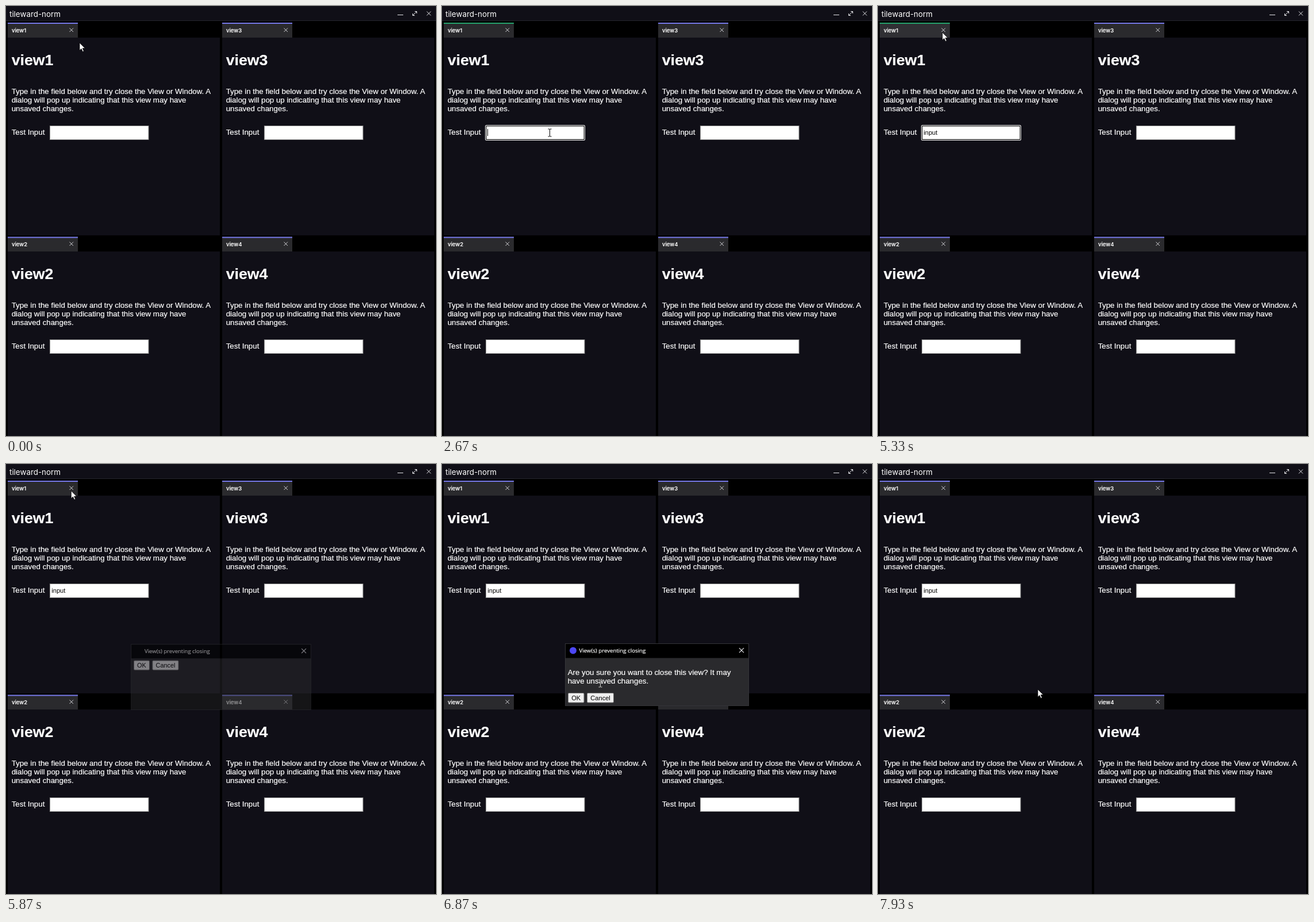
Write an HTML page that moves like this. It is 748 px wide and 748 px high and loops after 8 s.

```html
<!DOCTYPE html>
<html lang="en">
<head>
<meta charset="utf-8">
<title>Closing a view with unsaved input</title>
<style>
html, body { margin: 0; width: 100%; height: 100%; overflow: hidden; background: #000; }
svg { display: block; width: 748px; height: 748px; }
text { fill: #fff; stroke: #fff; stroke-width: .2px; font: 13.3px "Liberation Sans", Arial, sans-serif; white-space: pre; }
.title { font: 13.4px Inter, sans-serif; stroke: none; }
.tab { font: 500 9.5px Inter, sans-serif; }
.h1 { font-size: 26.7px; font-weight: bold; }
.small { font-size: 11.1px; fill: #000; stroke: none; }
.caption { font: 9.7px "Open Sans", sans-serif; }
.line { fill: none; stroke: #e4e4e8; }
</style>
</head>
<body>
<svg viewBox="0 0 748 748">
  <rect width="748" height="748"/>
  <rect width="748" height="25" fill="#100f17"/>
  <rect y="25" width="748" height="1" fill="#25252d"/>
  <text class="title" x="6" y="18.5">tileward-norm</text>
  <path class="line" d="M681 15.5h10M732 9.5l7 7m0-7l-7 7M707.5 16.5l7-7m-3.5 0h3.5v3.5M707.5 13v3.5h3.5"/>
  <g id="views"></g>
  <rect id="splitter" x="3" y="399" width="742" height="3" fill="#2f3036"/>
  <g id="focus">
    <rect x="75" y="207" width="174" height="27" rx="2.5" fill="#fff"/>
    <rect x="76" y="208" width="172" height="25" rx="1.5" fill="#101010"/>
    <rect x="77.3" y="209.3" width="169.4" height="22.4" fill="#fff"/>
  </g>
  <text id="typed" class="small" x="79.3" y="224"></text>
  <rect id="caret" y="214" width="1" height="12"/>

  <g id="dialog">
    <rect id="frame" x="214" y="312" width="320" fill="#2a2a2d"/>
    <rect x="214" y="312" width="320" height="25.5"/>
    <rect id="edge" x="214.5" y="312.5" width="319" fill="none" stroke="#343438"/>
    <circle id="logo" cx="228" cy="324.5" r="6" fill="#4d47f5"/>
    <text class="caption" x="238.4" y="328">View(s) preventing closing</text>
    <path class="line" stroke-width="1.2" d="M517 320.2l8 8m0-8l-8 8"/>
    <g id="message">
      <text x="218.7" y="366.8">Are you sure you want to close this view? It may</text>
      <text x="218.7" y="381.8">have unsaved changes.</text>
    </g>
    <g id="buttons">
      <rect x="219.5" y="398.5" width="27.5" height="16.5" rx="1.5" fill="#efefef" stroke="#767676"/>
      <rect id="cancel" x="252.5" y="398.5" width="46" height="16.5" rx="1.5" stroke="#767676"/>
      <text class="small" x="225.2" y="411">OK</text>
      <text class="small" x="258.3" y="411">Cancel</text>
    </g>
  </g>

  <path id="arrow" fill="#fff" stroke="#000" stroke-width=".7" d="M0 0V13.2L3.1 10.4L5.3 15.4L7.4 14.5L5.2 9.6H9.4Z"/>
  <path id="beam" fill="none" stroke="#fff" style="mix-blend-mode:difference" d="M-3 -6.5h2.5l.5 .5l.5 -.5h2.5M0 -6V6M-3 6.5h2.5l.5 -.5l.5 .5h2.5"/>
  <path id="resize" fill="#fff" stroke="#222" stroke-width=".8" d="M-9 0L-4.5 -4.5V-1.8H4.5V-4.5L9 0L4.5 4.5V1.8H-4.5V4.5Z"/>
</svg>
<script>
const LOOP = 8000, STEP = 1000 / 15;
const $ = id => document.getElementById(id);
const set = (id, name, value) => $(id).setAttribute(name, value);
const show = (id, on) => set(id, 'visibility', on ? 'visible' : 'hidden');
const between = (v, a, b) => v >= a && v < b;
const clamp = v => Math.max(0, Math.min(1, v));

const view = (n, x, y, top) => `<g transform="translate(${x} ${y})">
  <rect id="tab${n}" x="3" y="${top}" width="122" height="${55 - top}" fill="#2a2a2d"/>
  <rect id="bar${n}" x="3" y="${top}" width="122" height="2" fill="#7577e6"/>
  <text class="tab" x="10" y="45.5">view${n}</text>
  <path class="line" stroke-width=".9" d="M110.5 38.5l6.5 6.5m0-6.5l-6.5 6.5"/>
  <rect x="3" y="55" width="369" height="${y ? 321 : 344}" fill="#100f17"/>
  <text class="h1" x="9.7" y="103.2">view${n}</text>
  <text x="9.7" y="152.8">Type in the field below and try close the View or Window. A</text>
  <text x="9.7" y="167.8">dialog will pop up indicating that this view may have</text>
  <text x="9.7" y="182.8">unsaved changes.</text>
  <text x="9.7" y="224">Test Input</text>
  <rect id="field${n}" x="76.4" y="208.5" width="171.6" height="24" fill="#fff" stroke="#858585"/>
</g>`;
$('views').innerHTML = view(1, 0, 0, 29) + view(2, 0, 372, 29.5) + view(3, 373, 0, 29) + view(4, 373, 372, 29.5);

// Pointer path: time, x, y
const path = [
  [0, 128, 64], [200, 130, 76], [600, 148, 180], [870, 152, 212], [1070, 150, 217],
  [1800, 150, 217], [1930, 187, 220], [4600, 187, 220], [4800, 234, 222],
  [4930, 210, 165], [5130, 135, 72], [5330, 112, 46], [6130, 114, 47],
  [6330, 167, 86], [6400, 217, 137], [6600, 258, 280], [6800, 274, 370],
  [7000, 278, 400], [7870, 278, 400], [7930, 278, 392], [LOOP, 278, 392]
];
const keys = [3400, 3470, 3730, 3930, 4070];
const caretX = [79, 82, 88, 94, 100, 103];

function pointer(t) {
  const i = path.findIndex(p => p[0] > t);
  const [t0, x0, y0] = path[i - 1], [t1, x1, y1] = path[i];
  const k = (t - t0) / (t1 - t0);
  return [x0 + (x1 - x0) * k, y0 + (y1 - y0) * k];
}

function draw(t) {
  const [x, y] = pointer(t);
  const inField = between(x, 76, 248) && between(y, 208, 233);
  const open = between(t, 5735, 7730);
  const loaded = t >= 6070;

  // Input field and its tab
  const focused = between(t, 1600, 5735);
  const count = keys.filter(k => t >= k).length;
  const typing = between(t, 3400, 4600);
  show('focus', focused);
  $('typed').textContent = 'input'.slice(0, count);
  set('caret', 'x', caretX[count]);
  show('caret', typing || between(t, 1600, 2130) || between(t, 2670, 3200));
  set('bar1', 'fill', focused ? '#24a06b' : '#7577e6');
  set('tab1', 'fill', between(t, 5200, 5600) ? '#303034' : '#2a2a2d');
  set('field1', 'stroke', inField ? '#4f4f4f' : '#858585');

  // Dialog fades in while growing, then fits its height to the message
  const grow = clamp((t - 5735) / 265), scale = .96 + .04 * grow;
  const height = loaded ? 109 : 117;
  show('dialog', open);
  set('dialog', 'opacity', t >= 7670 ? .4 : grow);
  set('dialog', 'transform', `translate(374 370.5) scale(${scale}) translate(-374 -370.5)`);
  set('frame', 'height', height);
  set('edge', 'height', height - 1);
  $('logo').style.display = $('message').style.display = loaded ? '' : 'none';
  set('buttons', 'transform', `translate(0 ${loaded ? 0 : -57})`);
  set('cancel', 'fill', y > 398 ? '#e3e3e3' : '#efefef');
  show('splitter', between(t, 7730, 7930));

  // Pointer shape follows what lies beneath
  const onText = between(y, 141, 171) && x < 310 && !open;
  const onMessage = loaded && open && between(y, 355, 385);
  const kind = between(t, 7600, 7930) ? 'resize' : inField || onText || onMessage ? 'beam' : 'arrow';
  for (const id of ['arrow', 'beam', 'resize']) show(id, id === kind);
  const at = kind === 'arrow' ? [x, y] : kind === 'beam' ? [Math.round(x) + .5, Math.round(y) + .5] : [x, y + 2];
  set(kind, 'transform', `translate(${at})`);
}

function tick() {
  const step = Math.floor((performance.now() + 20) / STEP);
  draw(Math.round(step * STEP / 10) * 10 % LOOP);
  requestAnimationFrame(tick);
}
tick();
</script>
</body>
</html>
```
